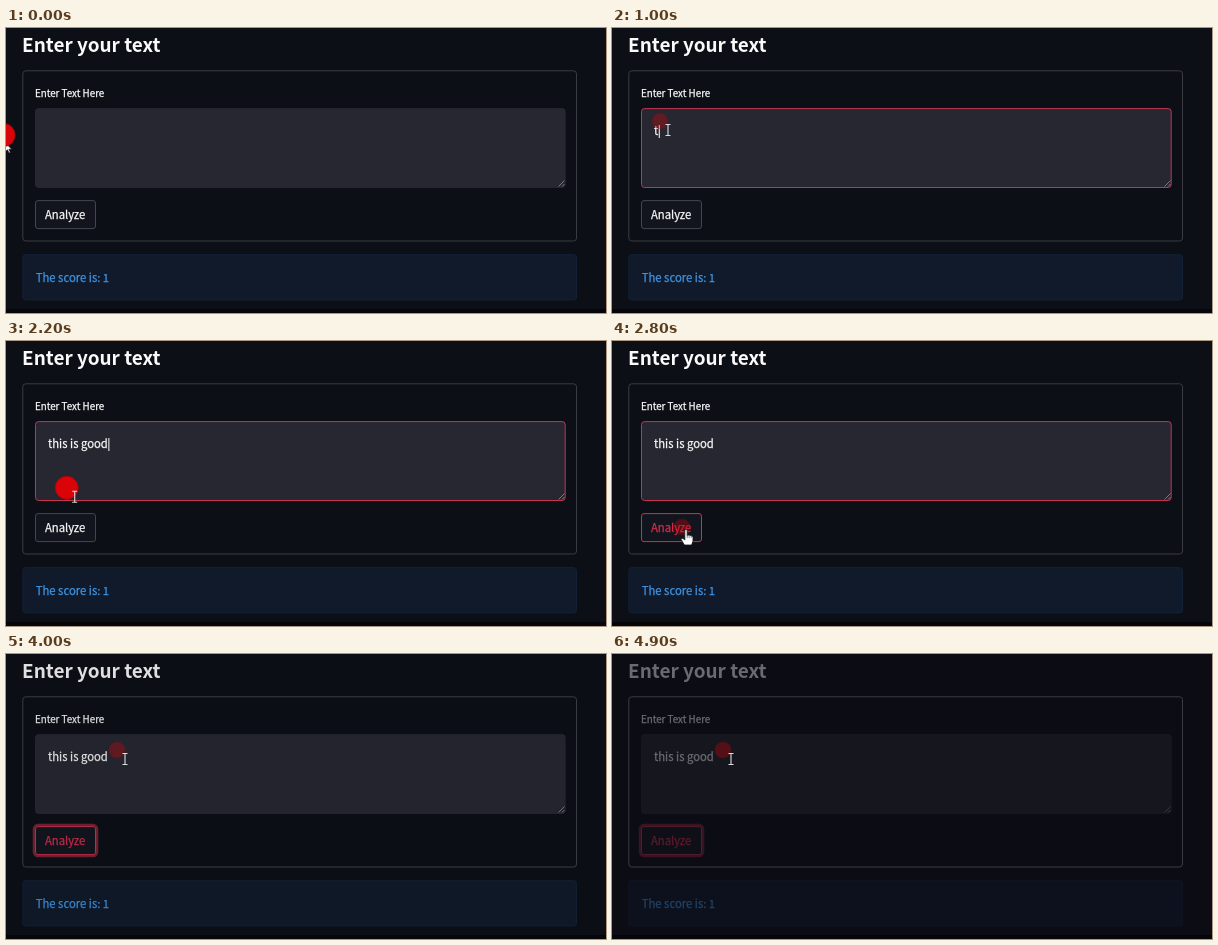
An HTML page for the animation above (5 s loop, 600 by 285 pixels).

```html
<!DOCTYPE html>
<html lang="en">
<head>
<meta charset="utf-8">
<title>Text score form</title>
<style>
  html, body { margin: 0; height: 100%; overflow: hidden; background: #0c0f15; }
  svg { display: block; width: 100vw; height: 100vh; }
  text {
    font: 11.3px "Noto Sans CJK JP", "Noto Sans CJK SC", "Noto Sans CJK", "Open Sans", sans-serif;
    fill: var(--ink);
    stroke: var(--ink);
    stroke-width: .25px;
    white-space: pre;
    --ink: #fafafa;
  }
  #title { font-size: 18.95px; font-weight: 700; stroke: none; }
  #label { font-size: 9.8px; }
  #score { --ink: #3f95e4; }
  #area { fill: #262730; stroke: #262730; }
  #area.focus { stroke: #c5344f; }
  .face { fill: #12151d; stroke: #44464d; }
  .ring { fill: none; stroke: none; }
  .hover .face { stroke: #c8324e; }
  .hover text { --ink: #d42e4c; }
  .focus .ring { stroke: #7c2034; stroke-width: 2.5; }
</style>
</head>
<body>
<svg viewBox="0 0 600 285">
  <rect width="600" height="285" fill="#0c0f15"/>
  <text id="title" x="16" y="23.7">Enter your text</text>
  <text id="label" x="28.9" y="68.9">Enter Text Here</text>

  <rect id="area" x="29.5" y="80.6" width="529.7" height="78.9" rx="3"/>
  <path d="M552.5 158.5l6-6M556 158.5l2.5-2.5" stroke="#8d8e94" stroke-width=".8"/>
  <text id="typed" x="42" y="107"></text>
  <rect id="caret" y="97" width="1" height="13" fill="#fff"/>

  <g id="button">
    <rect class="ring" x="28" y="171" width="63" height="31" rx="4"/>
    <rect class="face" x="29.5" y="172.6" width="60" height="28" rx="2.5"/>
    <text x="38.9" y="190.7">Analyze</text>
  </g>

  <rect x="16.8" y="226.6" width="553.7" height="45.4" rx="3" fill="#101a2a" stroke="#122136"/>
  <text id="score" x="29.7" y="253.9">The score is: 1</text>

  <rect id="veil" width="600" height="285" fill="#0c0d15" opacity="0"/>
  <rect y="281" width="600" height="4" fill="#05050a"/>
  <rect x="16.8" y="42.8" width="553.7" height="170.2" rx="3" fill="none" stroke="#3a3c42"/>

  <path id="arrow" d="M0 0v8.5l2-1.8 1.5 3.3 1.4-.6-1.5-3.2h2.8z" fill="#fff" stroke="#111" stroke-width=".6"/>
  <circle id="dot" r="11.5" fill="#d90308" stroke="#a3070f"/>
  <path id="beam" d="M-2.5-5.5H2.5M0-5.5V5.5M-2.5 5.5H2.5" fill="none" stroke="#dcdce0" stroke-width="1.1"/>
  <g id="hand" stroke="#15151a" stroke-width=".8">
    <path fill="#fff" d="M-1.2 0Q0-1.3 1.2 0V5.2L3 5 5 5.6 7 6.6V11L5.6 15H-1.6L-4.8 9.5Q-4.6 7.6-3 8.4L-1.2 10Z"/>
    <path d="M1.2 5v3M3.2 5.4v2.6M5.2 6v2" stroke-width=".5"/>
  </g>
</svg>
<script>
  const LOOP = 5000, STEP = 100;
  const TEXT = "this is good", TYPE_START = 1000, PRESS = 3000, FADE_START = 3800;
  const HOME = { x: -2.5, y: 107 };
  const MOVES = [
    { at: 0, time: 400, x: 48, y: 93 },
    { at: 2100, time: 400, x: 70, y: 186 },
    { at: PRESS, time: 300, x: 111, y: 96 }
  ];
  const [toArea, toButton] = MOVES;
  const FOCUS = toArea.at + toArea.time, HOVER = toButton.at + toButton.time;

  const $ = id => document.getElementById(id);
  const clamp = (v, lo, hi) => Math.min(hi, Math.max(lo, v));
  const easeOut = k => 1 - (1 - k) ** 3;
  const show = (id, on) => $(id).setAttribute("visibility", on ? "visible" : "hidden");

  // The dot is bright while it travels and dims soon after it rests.
  function pointer(t) {
    const i = MOVES.findLastIndex(m => t >= m.at);
    const to = MOVES[i], from = MOVES[i - 1] || HOME;
    const k = easeOut(clamp((t - to.at) / to.time, 0, 1));
    const rest = Math.max(0, t - to.at - to.time);
    return {
      x: from.x + (to.x - from.x) * k,
      y: from.y + (to.y - from.y) * k,
      glow: clamp(1 - rest / 150, .32, 1)
    };
  }

  function place(id, x, y, on) {
    $(id).setAttribute("transform", `translate(${x} ${y})`);
    show(id, on);
  }

  function draw(t) {
    const { x, y, glow } = pointer(t);
    place("dot", x, y, true);
    $("dot").setAttribute("r", glow < .5 ? 8 : 11.5);
    $("dot").setAttribute("opacity", glow);

    const onButton = t >= HOVER && t <= PRESS;
    const onArea = !onButton && x > 22 && y < 150;
    place("arrow", x + 2, y + 8, !onArea && !onButton);
    place("beam", x + 8, y + 9, onArea);
    place("hand", x + 4, y + 3, onButton);

    const typed = $("typed");
    const count = clamp(Math.floor((t - TYPE_START) / STEP) + 1, 0, TEXT.length);
    typed.textContent = TEXT.slice(0, count);
    $("caret").setAttribute("x", 42.5 + (count ? typed.getComputedTextLength() : 0));
    show("caret", t >= FOCUS && t <= HOVER);

    $("area").classList.toggle("focus", t >= FOCUS && t < PRESS);
    $("button").classList.toggle("hover", t >= HOVER);
    $("button").classList.toggle("focus", t >= PRESS);
    $("veil").setAttribute("opacity", clamp((t - FADE_START) * .00055, 0, 1));
  }

  const start = performance.now();
  function tick() {
    const t = (performance.now() - start) % LOOP;
    draw(Math.floor(t / STEP) * STEP);
    requestAnimationFrame(tick);
  }
  tick();
</script>
</body>
</html>
```
